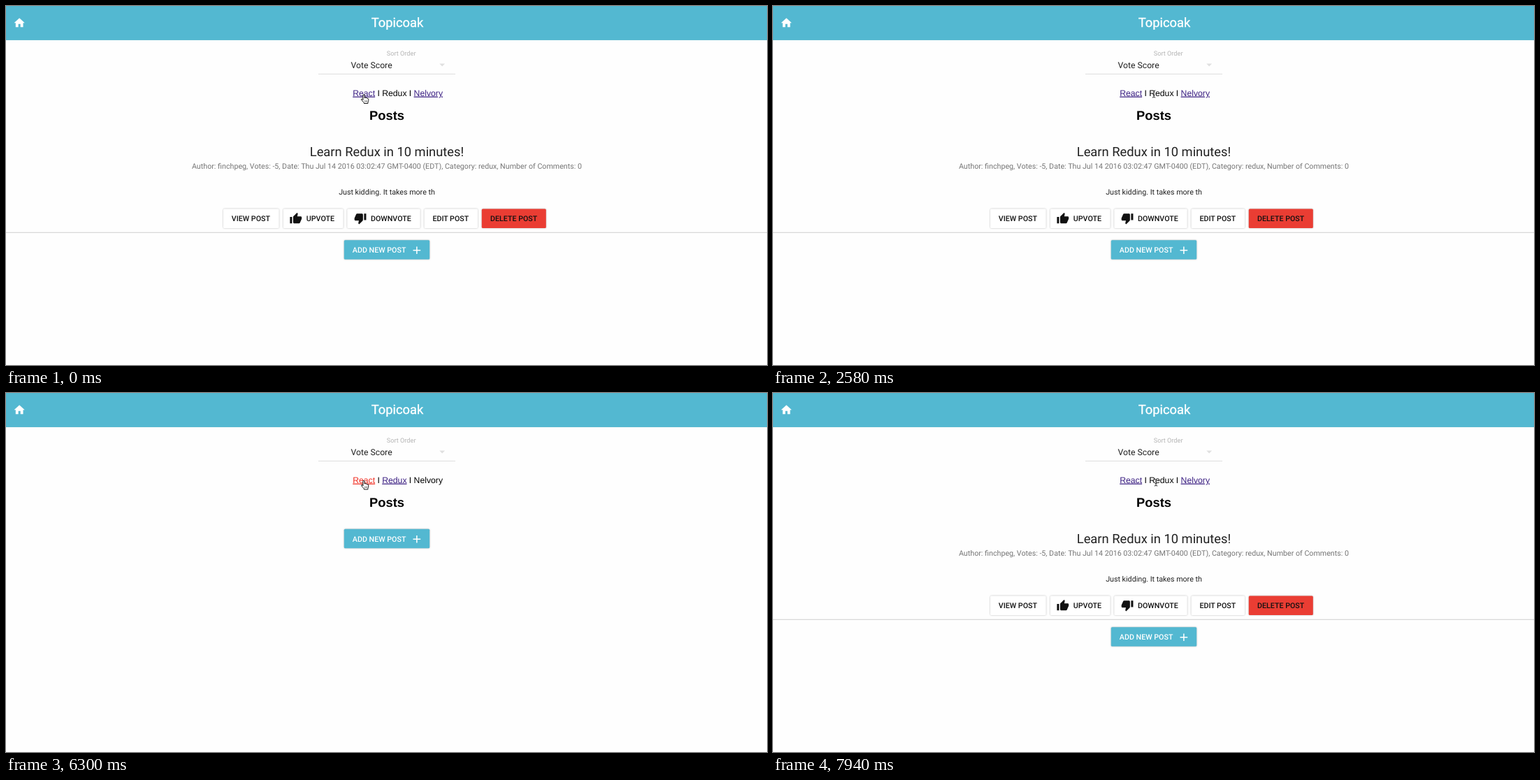
Write an HTML page that moves like this. It is 1089 px wide and 514 px high and loops after 8 s.

```html
<!DOCTYPE html>
<html lang="en">
<head>
<meta charset="utf-8">
<title>Posts</title>
<style>
  html, body { margin: 0; width: 100%; height: 100%; overflow: hidden; background: #fefefe; }
  svg { display: block; width: 100%; height: 100%; }
  text { font-family: Roboto, sans-serif; font-size: 10.7px; fill: #212121; text-rendering: geometricPrecision; white-space: pre; }
  .mid { text-anchor: middle; }
  .big { font-size: 18.34px; }
  .nav { font-family: "Liberation Sans", Arial, sans-serif; font-size: 12.22px; fill: #000; }
  .nav.link { fill: #3b1f82; text-decoration: underline; }
  .nav.down { fill: #f02b1f; }
  .btn text { font-weight: 500; fill: #111; }
  .btn rect { filter: drop-shadow(0 .8px .8px rgba(0, 0, 0, .28)); }
  .btn .light, .light { fill: #fff; }
  .accent { fill: #53b8d1; }
</style>
</head>
<body>
<svg viewBox="0 0 1089 514" preserveAspectRatio="none">
  <defs>
    <path id="thumb" d="M1 21h4V9H1zM23 10c0-1.1-.9-2-2-2h-6.3l1-4.6c0-.5-.1-1-.4-1.4L14.2 1 7.6 7.6C7.2 8 7 8.5 7 9v10c0 1.1.9 2 2 2h9c.8 0 1.5-.5 1.8-1.2l3-7.1c.1-.2.2-.5.2-.7z"/>
  </defs>
  <rect width="1089" height="514" fill="#fefefe"/>
  <rect class="accent" width="1089" height="48.9" style="filter:drop-shadow(0 .5px .6px rgba(0,0,0,.2))"/>
  <path class="light" transform="translate(10 15) scale(.764)" d="M10 20v-6h4v6h5v-8h3L12 3 2 12h3v8z"/>
  <text class="big mid light" x="560" y="30.2" stroke="#fff" stroke-width=".35">Topicoak</text>

  <text x="544.8" y="71" style="font-size:9.17px;fill:#b4b4b4">Sort Order</text>
  <text x="493.5" y="89.4" style="font-size:12.22px">Vote Score</text>
  <path d="M620.3 82.5h7.8l-3.9 4z" fill="#e0e0e0"/>
  <path d="M447 97.4H643" stroke="#dedede"/>

  <text class="nav" x="496.2" y="128.6">React</text>
  <text class="nav" x="538.2" y="128.6">Redux</text>
  <text class="nav" x="583.6" y="128.6">Nelvory</text>
  <g>
    <text style="font:12.22px 'Liberation Sans',Arial,sans-serif;fill:#000" x="531.5" y="128.6">I</text>
    <text style="font:12.22px 'Liberation Sans',Arial,sans-serif;fill:#000" x="576.7" y="128.6">I</text>
  </g>
  <text class="mid" x="545" y="163.2" style="font:bold 18.34px 'Liberation Sans',Arial,sans-serif;fill:#000">Posts</text>

  <g id="post">
    <text id="title" class="big mid" x="545" y="215.3"></text>
    <text id="meta" class="mid" x="545" y="233" style="fill:#757575"></text>
    <text id="body" class="mid" x="545" y="269.6"></text>
    <g id="buttons" class="btn"></g>
    <use href="#thumb" transform="translate(405.6 295.2) scale(.764)" fill="#111"/>
    <use href="#thumb" transform="translate(516.2 313.3) scale(-.764)" fill="#111"/>
    <path d="M0 324.4H1089" stroke="#d8d8d8" stroke-width="1.4"/>
  </g>

  <g id="add" class="btn">
    <rect class="accent" x="483.8" y="335.3" width="122.4" height="27.5" rx="1.5"/>
    <text class="light" x="495.8" y="353">ADD NEW POST</text>
    <path class="light" transform="translate(578.7 340.6) scale(.764)" d="M19 13h-6v6h-2v-6H5v-2h6V5h2v6h6z"/>
  </g>

  <g id="hand" stroke="#000" stroke-width=".9" stroke-linejoin="round">
    <path fill="#fff" d="M-1.1 1Q-1.1-.1 0-.1 1.1-.1 1.1 1V4.6Q1.4 3.9 2.2 4 3 4.1 3.1 4.9 3.5 4.3 4.2 4.5 5 4.7 5 5.4 6.7 5.2 6.7 6.6V8.5Q6.7 9.8 5.9 11V12.5H.3V11.4L-3.3 7.5Q-3.9 6.2-3 6-2 5.9-1.1 7.5z"/>
    <path d="M1.6 8.2V10.6M3.1 8.2V10.6M4.6 8.2V10.6" stroke-width=".5"/>
  </g>
  <g id="beam" fill="none">
    <path id="stem" d="M-2.2-5Q-.2-5 0-4 .2-5 2.2-5M0-4V4M-2.2 5Q-.2 5 0 4 .2 5 2.2 5M-1.2 1.4H1.2" stroke="#fff" stroke-width="1.8" stroke-opacity=".6"/>
    <use href="#stem" id="ink"/>
    <path d="M-2.2-5Q-.2-5 0-4 .2-5 2.2-5M0-4V4M-2.2 5Q-.2 5 0 4 .2 5 2.2 5M-1.2 1.4H1.2" stroke="#111" stroke-width=".9"/>
  </g>
</svg>
<script>
const LOOP = 8000;
const REACT = 0, REDUX = 1, SCHOOL = 2, NONE = -1;
const $ = id => document.getElementById(id);
const navs = [...document.querySelectorAll('.nav')];
$('ink').remove();

const posts = [
  {
    title: 'Nelvory is the best place to learn React',
    meta: 'Author: cedarfox, Votes: 6, Date: Tue Jun 28 2016 22:21:12 GMT-0400 (EDT), Category: react, Number of Comments: 0',
    body: 'Everyone says so after all.'
  },
  {
    title: 'Learn Redux in 10 minutes!',
    meta: 'Author: finchpeg, Votes: -5, Date: Thu Jul 14 2016 03:02:47 GMT-0400 (EDT), Category: redux, Number of Comments: 0',
    body: 'Just kidding. It takes more th'
  }
];

// label, left edge, width, text start, fill
const buttons = [
  ['VIEW POST', 311, 79.6, 322.8, '#fff'],
  ['UPVOTE', 396.8, 85.8, 429.8, '#fff'],
  ['DOWNVOTE', 488.3, 104.4, 522, '#fff'],
  ['EDIT POST', 598.6, 76.4, 610.4, '#fff'],
  ['DELETE POST', 680.8, 92, 693, '#ea3d33']
];
$('buttons').innerHTML = buttons.map(([label, x, w, tx, fill]) =>
  `<rect x="${x}" y="290.4" width="${w}" height="27.5" rx="1.5" fill="${fill}"/>` +
  `<text x="${tx}" y="307.8">${label}</text>`).join('');

// start time, category, pressed link, cursor, x, y
const cues = [
  [0, REDUX, NONE, 'hand', 512, 127],
  [450, REDUX, REACT, 'hand', 512, 127],
  [650, REACT, NONE, 'beam', 512, 126],
  [800, REACT, NONE, 'beam', 511, 125],
  [1100, REACT, NONE, 'beam', 515, 126],
  [1250, REACT, NONE, 'beam', 532, 128],
  [1400, REACT, NONE, 'hand', 543, 126.5],
  [1540, REACT, NONE, 'hand', 545.5, 126],
  [2290, REACT, REDUX, 'hand', 545.5, 126],
  [2430, REDUX, NONE, 'beam', 545, 126],
  [2580, REDUX, NONE, 'beam', 545, 126],
  [3330, REDUX, NONE, 'beam', 554, 127],
  [3470, REDUX, NONE, 'hand', 592, 125],
  [3620, REDUX, NONE, 'hand', 601, 124],
  [4370, REDUX, SCHOOL, 'hand', 601, 123],
  [4510, REDUX, SCHOOL, 'beam', 601, 121.5],
  [4660, SCHOOL, NONE, 'beam', 601, 121.5],
  [4960, SCHOOL, NONE, 'beam', 590, 124],
  [5100, SCHOOL, NONE, 'hand', 551, 126],
  [5250, SCHOOL, NONE, 'hand', 519, 126],
  [5400, SCHOOL, NONE, 'hand', 512, 125.5],
  [6150, SCHOOL, REACT, 'hand', 512, 125.5],
  [6450, REACT, NONE, 'beam', 511, 125],
  [6600, REACT, NONE, 'beam', 518, 127],
  [6750, REACT, NONE, 'hand', 542, 128],
  [6890, REACT, NONE, 'hand', 548, 128],
  [7640, REACT, REDUX, 'hand', 548, 128],
  [7780, REDUX, NONE, 'beam', 548, 128],
  [7940, REDUX, NONE, 'beam', 548, 128]
];

const show = (el, on) => { el.style.display = on ? '' : 'none'; };

function draw(time) {
  const [, category, pressed, cursor, x, y] = cues.filter(c => c[0] <= time).pop();
  navs.forEach((el, i) => {
    el.classList.toggle('link', i !== category);
    el.classList.toggle('down', i === pressed);
  });
  const post = posts[category];
  show($('post'), post);
  for (const key in post) $(key).textContent = post[key];
  $('add').setAttribute('transform', `translate(0 ${post ? 0 : -140.5})`);
  for (const kind of ['hand', 'beam']) {
    show($(kind), kind === cursor);
    $(kind).setAttribute('transform', `translate(${x} ${y})`);
  }
}

const start = performance.now();
function tick() {
  draw((performance.now() - start) % LOOP);
  requestAnimationFrame(tick);
}
tick();
</script>
</body>
</html>
```
